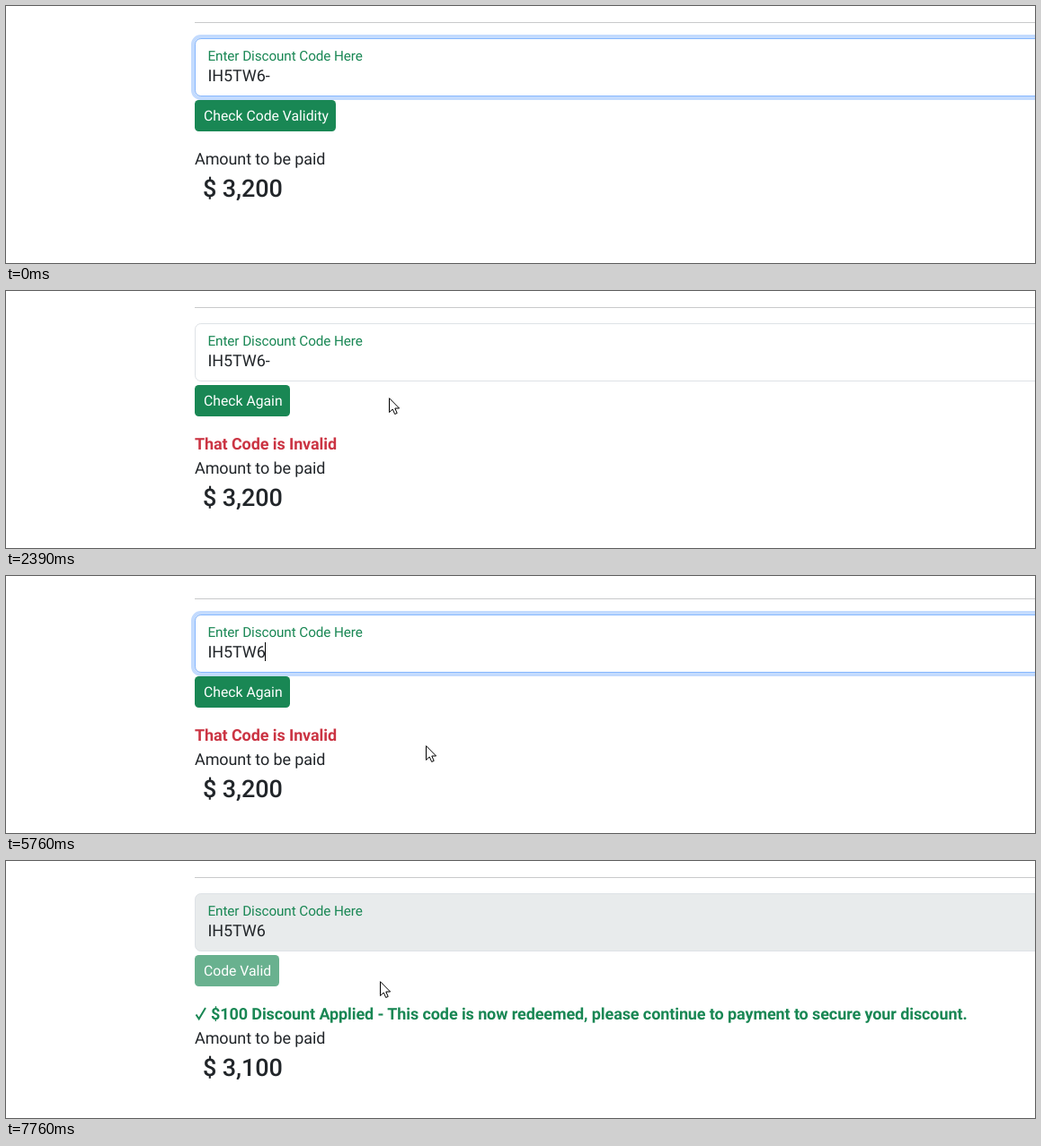
An HTML page that plays this animation: 1145x287 px, repeating every 8000 ms.

```html
<!DOCTYPE html>
<html lang="en">
<head>
<meta charset="utf-8">
<title>Discount code form</title>
<style>
  html, body { margin: 0; height: 100%; overflow: hidden; background: #fff; }
  svg { display: block; width: 1145px; height: 287px; }
  text { font: 18px Roboto, sans-serif; letter-spacing: -.1px; fill: #212529; text-rendering: geometricPrecision; white-space: pre; }
  #label { font-size: 15.3px; fill: #198754; }
  #btnText { font-size: 15.75px; letter-spacing: 0; fill: #fff; }
  #price { font-size: 27px; font-weight: 500; }
  #error { font-weight: 700; fill: #cb3443; }
  #success text { font-weight: 700; fill: #198754; }
</style>
</head>
<body>
<svg viewBox="0 0 1145 287">
  <g id="page">
    <path d="M210 18.5H1145" stroke="#c8c9ca"/>
    <rect id="field" x="210.5" y="36.5" width="1000" height="64" rx="6.3" stroke="#dee2e6"/>
    <g id="ring" fill="none">
      <rect x="208" y="34" width="1000" height="69" rx="8.7" stroke="#c3dbfe" stroke-width="4"/>
      <rect x="210.5" y="36.5" width="1000" height="64" rx="6.3" stroke="#86b7fe"/>
    </g>
    <text id="label" x="224.5" y="61">Enter Discount Code Here</text>
    <text id="code" x="224.5" y="84"></text>
    <rect id="caret" y="67" width="1" height="21"/>
    <g id="button">
      <rect id="face" x="210" y="105" height="35" rx="4.5"/>
    </g>
    <text id="btnText" x="220" y="128"></text>
    <circle id="spinner" r="7.5" fill="none" stroke="#fff" stroke-width="3" pathLength="4" stroke-dasharray="3 1"/>
    <text id="error" x="210" y="177">That Code is Invalid</text>
    <g id="success">
      <path d="M211.5 171.5l3.2 4.8 7.3-12.3" fill="none" stroke="#198754" stroke-width="2"/>
      <text x="228" y="177">$100 Discount Applied - This code is now redeemed, please continue to payment to secure your discount.</text>
    </g>
    <g id="total">
      <text x="210" y="177">Amount to be paid</text>
      <text id="price" x="219" y="213"></text>
    </g>
  </g>
  <path id="arrow" d="M.5 .7V16.5L4.2 13 6.7 18.5 9.2 17.4 6.8 12H11.6Z" fill="#fff" stroke="#000"/>
  <path id="beam" d="M-3-7.5H0M1-7.5H4M.5-7V8M-3 8.5H0M1 8.5H4" fill="none" stroke="#000"/>
</svg>
<script>
const LOOP = 8000, STEP = 90, BLINK = 530;
const BLUR = 1940, FOCUS = 3980, EDIT = 4920, LEAVE = 6040;
const $ = id => document.getElementById(id);

const buttons = {
  idle: { text: 'Check Code Validity', width: 157 },
  checking: { text: 'Checking...', width: 118, disabled: true },
  invalid: { text: 'Check Again', width: 106 },
  valid: { text: 'Code Valid', width: 94, disabled: true }
};

// Pointer moves: start, steps, x, y
const moves = [
  [90, 1, 538, 192], [180, 2, 490, 135], [930, 8, 335, 118], [BLUR, 6, 426, 119], [3250, 6, 408, 91],
  [5670, 1, 462, 175], [5760, 1, 467, 182], [6410, 9, 301, 127], [7310, 6, 416, 134]
];

const show = (id, on) => $(id).setAttribute('visibility', on ? 'visible' : 'hidden');
const set = (id, name, value) => $(id).setAttribute(name, value);
const write = (id, s) => { if ($(id).textContent !== s) $(id).textContent = s; };

// Eased 0 to 1 in n steps
function ramp(t, start, n) {
  const p = Math.max(0, Math.min(1, (Math.floor((t - start) / STEP) + 1) / n));
  return (p + p * p * (3 - 2 * p)) / 2;
}

function phaseAt(t) {
  if (t < 2030) return 'idle';
  if (t < 2300) return 'checking';
  if (t < 7310) return 'invalid';
  return t < 7580 ? 'checking' : 'valid';
}

function pointerAt(t) {
  let x = 0, y = 0;
  for (const [start, n, toX, toY] of moves) {
    const p = ramp(t, start, n);
    x += (toX - x) * p;
    y += (toY - y) * p;
  }
  return [Math.round(x), Math.round(y)];
}

function hovered(t) {
  const [x, y] = pointerAt(t), b = buttons[phaseAt(t)];
  return !b.disabled && x < 210 + b.width && y >= 105 && y < 140;
}

function caretOn(t) {
  const start = t < BLUR ? 20 : t < EDIT ? 3920 : 5480;
  return Math.floor((t - start) / BLINK + 2) % 2 === 0;
}

function draw(t) {
  const phase = phaseAt(t), { text, width, disabled } = buttons[phase];
  const checked = t >= 2300, valid = phase === 'valid', edited = t >= EDIT;
  const focus = 1 - ramp(t, BLUR, 2) + ramp(t, FOCUS, 2) - ramp(t, LEAVE, 2);
  const scroll = Math.round(7 * (ramp(t, EDIT, 2) - ramp(t, LEAVE, 3)));

  set('page', 'transform', `translate(0 ${scroll})`);
  set('field', 'fill', disabled ? '#e8ebec' : '#fff');
  set('ring', 'opacity', focus);
  write('code', edited ? 'IH5TW6' : 'IH5TW6-');
  set('caret', 'x', edited ? 288 : 293);
  show('caret', focus > 0 && caretOn(t));

  set('face', 'width', width);
  set('face', 'fill', hovered(t - STEP) ? '#157347' : '#198754');
  set('button', 'opacity', disabled ? .65 : 1);
  write('btnText', text);
  set('spinner', 'transform', `translate(${191 + width} 121) rotate(${t * .48 % 360 + 170})`);
  show('spinner', phase === 'checking');

  show('error', checked && !valid);
  show('success', valid);
  set('total', 'transform', `translate(0 ${checked ? 27 : 0})`);
  write('price', valid ? '$ 3,100' : '$ 3,200');

  const [x, y] = pointerAt(t);
  const typing = t >= EDIT && t < 5670;
  const shape = y < 101 ? 'beam' : 'arrow';
  for (const id of ['arrow', 'beam']) {
    set(id, 'transform', `translate(${x} ${y + scroll})`);
    show(id, t >= 90 && !typing && id === shape);
  }
}

function tick() {
  draw(performance.now() % LOOP);
  requestAnimationFrame(tick);
}
tick();
</script>
</body>
</html>
```
